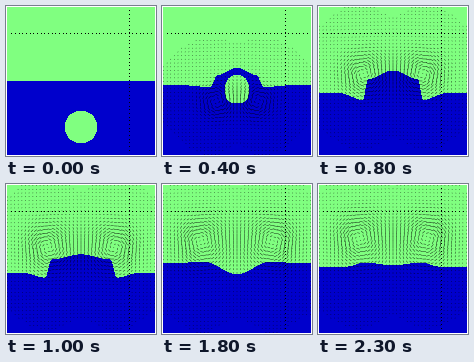
A matplotlib script for the animation above (2.4 s loop, 150x150 px).

```python
import numpy as np
import matplotlib.pyplot as plt
from matplotlib.animation import FuncAnimation
from matplotlib.collections import LineCollection
from matplotlib.patches import Polygon, Rectangle

SIZE, FRAMES, STEP = 150, 24, 100
MID = SIZE / 2
BURST = 400
GAS, LIQUID = "#80ff80", "#0000cc"

NODES = np.linspace(1.5, SIZE - 1.5, 41)
GX, GY = np.meshgrid(NODES, NODES)
WALLS = np.sin(np.pi * GX / SIZE) * np.sin(np.pi * GY / SIZE)


def smooth(s):
    s = np.clip(s, 0, 1)
    return s * s * (3 - 2 * s)


def ease(t, *turns):
    """Ease from one (time, value) turning point to the next."""
    value = turns[0][1]
    for (t0, a), (t1, b) in zip(turns, turns[1:]):
        value += (b - a) * smooth((t - t0) / (t1 - t0))
    return value


def liquid_outline(t):
    """Sloshing side level, swelling centre and a ring crest moving outwards."""
    side = ease(t, (0, 75), (1000, 89), (1800, 79), (2300, 83))
    centre = ease(t, (0, 75), (500, 61), (1800, 91), (2300, 82))
    crest = ease(t, (0, 75), (500, 69), (1000, 76), (2300, 79))
    dip = ease(t, (200, 0), (800, 7), (1400, 0))
    ring = ease(t, (400, 19), (1400, 34), (1800, 34), (2300, 28))
    foot = ring + ease(t, (0, 14), (600, 5), (2300, 17))

    x = np.linspace(0, SIZE, 301)
    r = np.abs(x - MID)
    inner = centre + (crest - centre) * smooth(r / ring)
    wall = crest + (side + dip - crest) * smooth((r - ring) / (foot - ring))
    outer = side + dip * (1 - smooth((r - foot) / 25))
    y = np.where(r < ring, inner, np.where(r < foot, wall, outer))
    return np.vstack([np.column_stack([x, y]), [(SIZE, SIZE), (0, SIZE)]])


def bubble_outline(t):
    """A rising disc whose base flattens."""
    s = t / BURST
    a = np.pi / 12 + np.arange(12) * np.pi / 6
    cos, sin = np.cos(a), np.sin(a)
    power = np.where(sin > 0, 1 - 0.4 * smooth(2 * s), 1)
    x = MID + (16 - 4 * s) * np.sign(cos) * np.abs(cos) ** power
    y = 121 - 38 * s ** 1.4 + (16 - 2 * s) * sin
    return np.column_stack([x, y])


def arrows(t):
    """Velocity of a vortex pair that climbs and spreads."""
    d = ease(t, (0, 16), (1400, 42), (2300, 38))
    y = ease(t, (0, 115), (1000, 62), (2300, 52))
    core = ease(t, (0, 13), (1400, 23))

    def swirl(x):
        return 1 / (1 + ((GX - x) ** 2 + (GY - y) ** 2) / core ** 2)

    psi = (swirl(MID + d) - swirl(MID - d)) * WALLS
    u, v = np.gradient(psi, NODES, NODES)
    v = -v
    speed = np.hypot(u, v)
    length = 5 * speed / speed.max()
    keep = length > 0.08
    scale = np.maximum(length, 0.9)[keep] / speed[keep]
    tail = np.column_stack([GX[keep], GY[keep]])
    move = np.column_stack([u[keep] * scale, v[keep] * scale])
    return np.stack([tail, tail + move], axis=1)


fig = plt.figure(figsize=(1.5, 1.5), dpi=100, facecolor="white")
ax = fig.add_axes([0, 0, 1, 1])
ax.set(xlim=(0, SIZE), ylim=(SIZE, 0))
ax.axis("off")

box = Rectangle((1, 1), SIZE - 2, SIZE - 2, fc=GAS, lw=0, antialiased=False)
liquid = Polygon(liquid_outline(0), fc=LIQUID, lw=0, antialiased=False)
bubble = Polygon(bubble_outline(0), fc=GAS, lw=0, antialiased=False)
flow = LineCollection([], colors="black", linewidths=0.3)
flow.set_snap(False)
for patch in (box, liquid, bubble):
    ax.add_patch(patch)
ax.add_collection(flow)
for artist in (liquid, bubble, flow):
    artist.set_clip_path(box)

inside = NODES[1:-1]
ax.plot(inside, np.full_like(inside, 27.5), "k,")
ax.plot(np.full_like(inside, 122.5), inside, "k,")


def draw(frame):
    t = frame * STEP
    liquid.set_xy(liquid_outline(t))
    bubble.set_xy(bubble_outline(min(t, BURST)))
    bubble.set_visible(t <= BURST)
    flow.set_segments(arrows(t) if frame else [])
    return liquid, bubble, flow


anim = FuncAnimation(fig, draw, frames=FRAMES, interval=STEP, repeat=True,
                     repeat_delay=0, blit=False)
plt.show()
```
